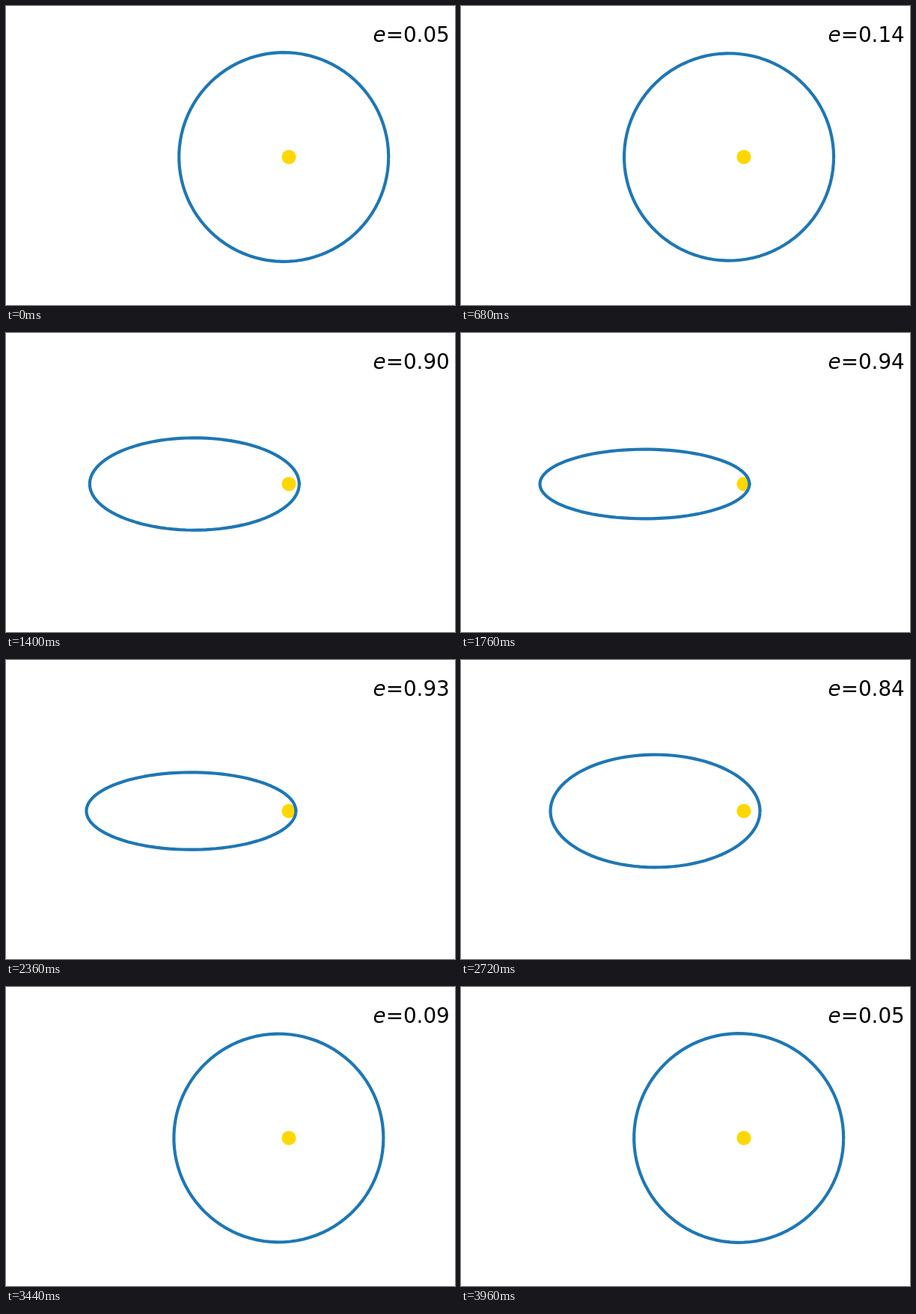
An HTML page for the animation above (4 s loop, 600x400 px).

```html
<!DOCTYPE html>
<html lang="en">
<head>
<meta charset="utf-8">
<title>Orbit eccentricity</title>
<style>
  html, body { margin: 0; width: 100%; height: 100%; overflow: hidden; background: #fff; }
  svg { display: block; width: 600px; height: 400px; }
  text { font: 27.78px "DejaVu Sans", sans-serif; }
  .symbol { font-style: oblique; }
  #orbit { fill: none; stroke: #1f77b4; stroke-width: 4.17; stroke-linecap: square; stroke-linejoin: round; }
</style>
</head>
<body>
<svg viewBox="0 0 600 400">
  <circle cx="378" cy="202" r="9.6" fill="#ffd700"/>
  <polyline id="orbit"/>
  <text x="490.6" y="48"><tspan class="symbol">e</tspan><tspan id="value">=0.05</tspan></text>
</svg>
<script>
  const FOCUS = { x: 377.5, y: 202 };
  const SEMI_MAJOR = 140;
  const STEP_MS = 40, STEPS = 100, POINTS = 100;
  const orbit = document.getElementById('orbit');
  const value = document.getElementById('value');

  // Arctangent ramp over -7..7, played forwards and then backwards.
  function eccentricity(step) {
    const k = Math.min(step, STEPS - 1 - step);
    return 0.5 + Math.atan(-7 + 14 * k / (STEPS / 2 - 1)) / Math.PI;
  }

  function ellipsePoints(e) {
    const semiMinor = SEMI_MAJOR * Math.sqrt(1 - e * e);
    return Array.from({ length: POINTS }, (_, n) => {
      const angle = 2 * Math.PI * n / (POINTS - 1);
      const x = FOCUS.x + SEMI_MAJOR * (Math.cos(angle) - e);
      const y = FOCUS.y - semiMinor * Math.sin(angle);
      return x.toFixed(3) + ',' + y.toFixed(3);
    }).join(' ');
  }

  let shown = -1;
  function draw(time) {
    const step = Math.floor(time / STEP_MS) % STEPS;
    if (step === shown) return;
    shown = step;
    const e = eccentricity(step);
    orbit.setAttribute('points', ellipsePoints(e));
    value.textContent = '=' + e.toFixed(2);
  }

  let start;
  function tick(now) {
    start ??= now;
    draw(now - start);
    requestAnimationFrame(tick);
  }
  draw(0);
  requestAnimationFrame(tick);
</script>
</body>
</html>
```
